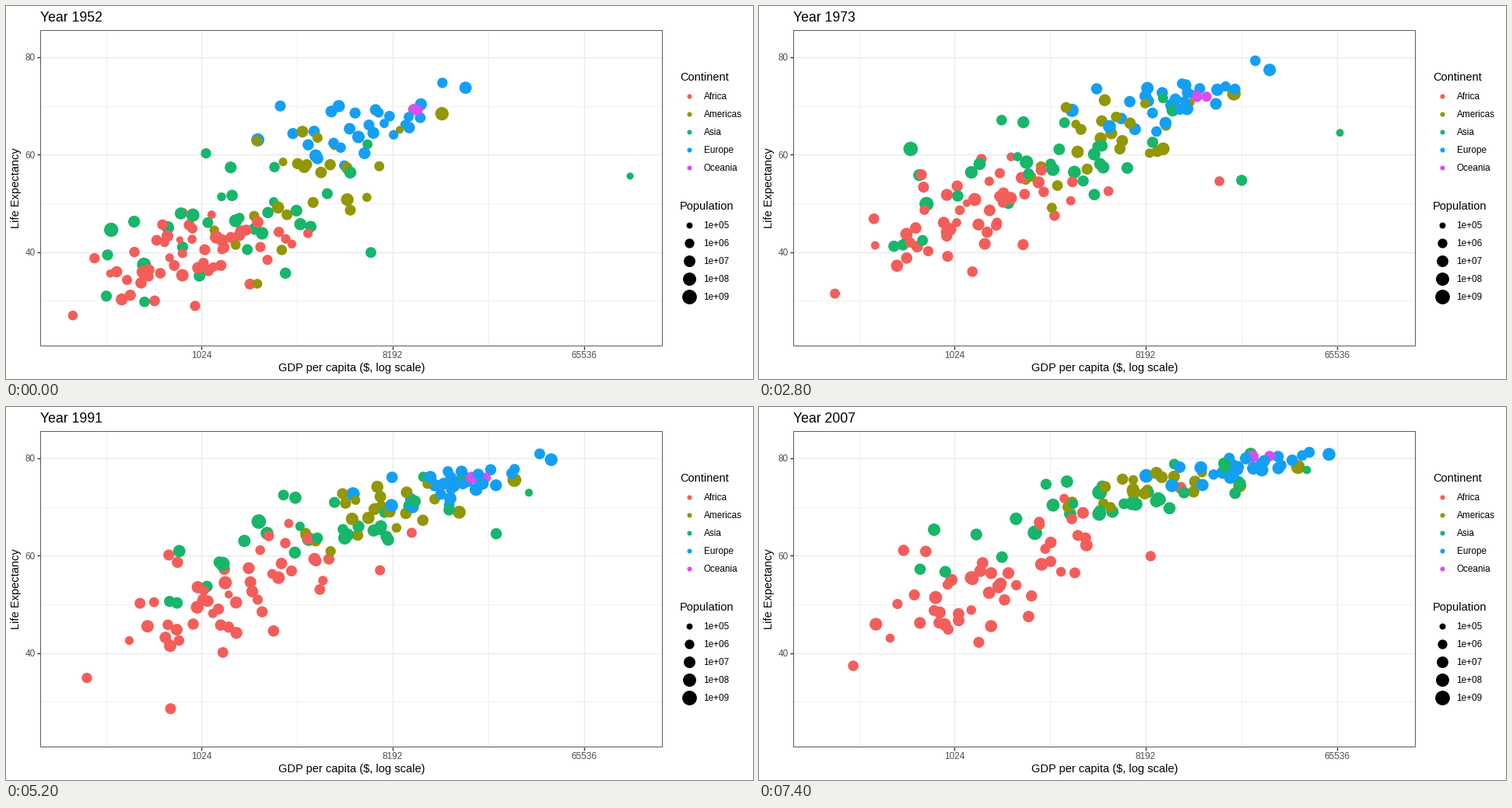
Write a matplotlib script that moves like this. It is 960x480 px and loops after 7500 ms.

```python
import matplotlib.pyplot as plt
import numpy as np
from matplotlib.animation import FuncAnimation
from matplotlib.patches import Rectangle

plt.rcParams["font.family"] = "Liberation Sans"
DPI, FRAMES = 96, 75
FIRST, MID, LAST = 1952, 1978, 2007
SURVEYS = np.arange(FIRST, LAST + 1, 5)
AGE = (SURVEYS - FIRST) / (LAST - FIRST)
MAX_LIFE = 80.5
rng = np.random.default_rng(11)

COLORS = {"Africa": "#F35E5A", "Americas": "#929705", "Asia": "#17B66A",
          "Europe": "#149FF5", "Oceania": "#DB4DF0"}

# Dot count, mean log2 GDP and life at FIRST, MID and LAST,
# first and last spread of each, mean log10 population.
CROWDS = {
    "Africa": (50, (9.85, 10.4, 10.6), (39.3, 50, 54.6), (.8, 1.1), (5, 8), 6.5),
    "Americas": (24, (11.66, 12.5, 13), (53.5, 65, 73.6), (.72, .8), (8.5, 3), 6.5),
    "Asia": (28, (10.6, 11.7, 12.4), (47, 61, 71), (1, 1.3), (8, 5.5), 6.9),
    "Europe": (30, (12.5, 13.65, 14.5), (65.8, 72.6, 78.1), (.75, .7), (4, 2), 6.8),
    "Oceania": (2, (13.36, 14, 14.8), (69.2, 72.6, 80.4), (.05, .15), (.2, .4), 6.5),
}

# Loners: continent, log10 population, first and last (GDP, life),
# detour (year, half width, log2 GDP shift, life shift).
LONERS = (
    ("Asia", 5.2, (108382, 55.6), (47307, 77.6), (1985, 15, -1.2, 3)),
    ("Asia", 6.6, (6460, 39.9), (21655, 72.8), (1978, 25, 1.5, 3)),
    ("Asia", 8.75, (400, 44), (4959, 73), (1975, 25, -.8, 7)),
    ("Asia", 8.57, (547, 37.4), (2452, 64.7), (1980, 25, -.5, 3)),
    ("Asia", 6.7, (368, 39.4), (1714, 59.7), (1978, 8, -.5, -16)),
    ("Africa", 6.4, (493, 40), (863, 46.2), (1992, 8, 0, -19)),
    ("Africa", 6, (2387, 42.7), (12057, 74), (1973, 22, 2.2, 0)),
    ("Americas", 8.2, (13990, 68.4), (42952, 78.2), (1978, 25, 0, .5)),
)


def ramp(ends):
    return ends[0] + (ends[1] - ends[0]) * AGE


def trend(keys):
    return np.interp(SURVEYS, (FIRST, MID, LAST), keys)


def spread(n):
    """Shuffled, evenly spaced quantiles of a normal distribution."""
    p = (np.arange(n) + .5) / n
    return rng.permutation(4.91 * (p ** .14 - (1 - p) ** .14))[:, None]


def drift(n):
    """Normal scores that slowly trade ranks, with a small wobble."""
    turn = .6 * AGE
    wobble = rng.normal(0, .07, (n, len(SURVEYS)))
    return spread(n) * np.cos(turn) + spread(n) * np.sin(turn) + wobble


def crowd(n, gdp, life, sd_gdp, sd_life, pop):
    u, v, rho = drift(n), drift(n), ramp((.5, .75))
    x = trend(gdp) + ramp(sd_gdp) * u
    y = trend(life) + ramp(sd_life) * (rho * u + np.sqrt(1 - rho ** 2) * v)
    return x, y, pop + .55 * spread(n) + .35 * AGE


def loner(_, pop, start, end, detour):
    year, width, dx, dy = detour
    bump = np.maximum(0, 1 - abs(SURVEYS - year) / width)
    x = ramp(np.log2([start[0], end[0]])) + dx * bump
    y = ramp((start[1], end[1])) + dy * bump
    return x[None], y[None], (pop + .35 * AGE)[None]


def radius(log_pop):
    t = np.clip((log_pop - 4.778) / 4.342, 0, 1)
    return 2.37 + 7.11 * np.sqrt(t)


def area(r):
    return (2 * np.asarray(r) * 72 / DPI) ** 2


parts = [crowd(*spec) for spec in CROWDS.values()]
parts += [loner(*spec) for spec in LONERS]
tints = [COLORS[c] for c, spec in CROWDS.items() for _ in range(spec[0])]
tints += [COLORS[spec[0]] for spec in LONERS]
order = rng.permutation(len(tints))
X, Y, P = (np.concatenate(a)[order] for a in zip(*parts))
Y = np.where(Y > MAX_LIFE, MAX_LIFE + .3 * (Y - MAX_LIFE), Y)
tints = [tints[i] for i in order]

W, H = 960, 480
LEFT, RIGHT, TOP, BOTTOM = 44.3, 843.8, 31.2, 437.8
fig = plt.figure(figsize=(W / DPI, H / DPI), dpi=DPI, facecolor="white")

ax = fig.add_axes([LEFT / W, 1 - BOTTOM / H, (RIGHT - LEFT) / W, (BOTTOM - TOP) / H])
ax.set(xlim=(7.470, 17.236), ylim=(20.65, 85.55))
ax.set_axisbelow(True)
ax.set_xticks([10, 13, 16], ["1024", "8192", "65536"])
ax.set_xticks([8.5, 11.5, 14.5], minor=True)
ax.set_yticks([40, 60, 80])
ax.set_yticks([30, 50, 70], minor=True)
ax.grid(which="major", color="#EBEBEB", lw=1.07)
ax.grid(which="minor", color="#EBEBEB", lw=.53)
ax.tick_params(which="major", length=2.75, width=1.07, color="#333333",
               labelsize=8.8, labelcolor="#4D4D4D", pad=2.2)
ax.tick_params(which="minor", length=0)
ax.spines[:].set_visible(False)

# Pixel-space layer for the frame, titles and legends
page = fig.add_axes([0, 0, 1, 1])
page.set(xlim=(0, W), ylim=(H, 0))
page.axis("off")
page.add_patch(Rectangle((44.5, 31.5), 799, 406, fill=False, ec="#5A5A5A",
                         lw=.75, snap=False))


def label(x, y, text, size=11, **kw):
    return page.text(x, y, text, fontsize=size, va="baseline", **kw)


def legend(title, y, entries):
    label(866, y, title)
    for i, (name, color, r) in enumerate(entries):
        row = y + 20.1 + 23.04 * i
        page.scatter(877.6, row, s=area(r), c=color, lw=0)
        label(896.5, row + 4.2, name, 8.8)


title = label(44, 20, "", 13.2)
label(444, 470, "GDP per capita ($, log scale)", ha="center")
page.text(13, 234.5, "Life Expectancy", fontsize=11, rotation=90,
          ha="center", va="center")
legend("Continent", 96, [(name, c, 3.07) for name, c in COLORS.items()])
legend("Population", 262, [(f"1e+{p:02d}", "black", radius(p)) for p in range(5, 10)])

dots = ax.scatter(X[:, 0], Y[:, 0], s=area(radius(P[:, 0])), c=tints, lw=0, zorder=2)


def draw(frame):
    year = FIRST + (LAST - FIRST) * frame / (FRAMES - 1)
    step = (year - FIRST) / 5
    i = min(int(step), len(SURVEYS) - 2)
    f = step - i
    x, y, p = (a[:, i] * (1 - f) + a[:, i + 1] * f for a in (X, Y, P))
    dots.set_offsets(np.column_stack([x, y]))
    dots.set_sizes(area(radius(p)))
    title.set_text(f"Year {round(year)}")
    return dots, title


anim = FuncAnimation(fig, draw, frames=FRAMES, interval=100, repeat=True,
                     repeat_delay=0, blit=False)
plt.show()
```
